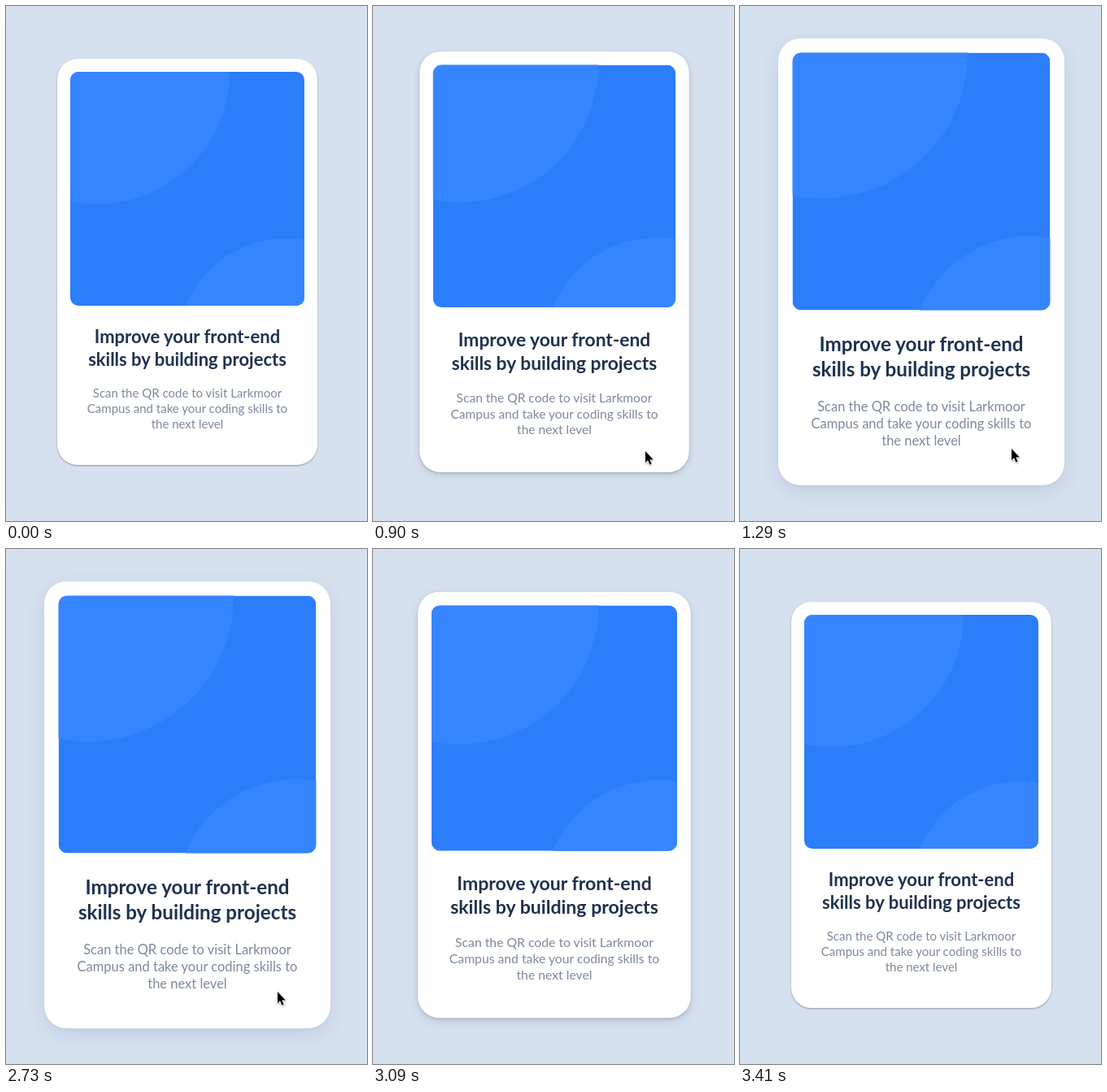
An HTML page that plays this animation: 444x634 px, repeating every 3.74 s.

```html
<!DOCTYPE html>
<html lang="en">
<head>
<meta charset="utf-8">
<title>Card hover</title>
<style>
  html, body { margin: 0; width: 100%; height: 100%; overflow: hidden; background: #d5e1ef; }
  #card {
    position: absolute; left: 63px; top: 65px; width: 320px; height: 500px;
    border-radius: 25px; background: #fff;
  }
  #card svg { display: block; }
  text { font-family: Lato, sans-serif; text-anchor: middle; }
  .title { font-size: 22px; font-weight: 700; fill: #1f314f; }
  .note { font-size: 15px; fill: #7d889e; }
  #cursor {
    position: absolute; left: 0; top: 0; overflow: visible;
    filter: drop-shadow(0 1px 1px rgba(0, 0, 0, .3));
  }
</style>
</head>
<body>
<div id="card">
  <svg width="320" height="500" viewBox="0 0 320 500">
    <clipPath id="frame"><rect x="16" y="16" width="288" height="288" rx="10"/></clipPath>
    <g clip-path="url(#frame)">
      <rect x="16" y="16" width="288" height="288" fill="#2c7dfa"/>
      <g fill="#3685ff">
        <circle cx="49" cy="16" r="163"/>
        <circle cx="282" cy="355" r="134"/>
      </g>
    </g>
    <g class="title">
      <text x="160" y="350">Improve your front-end</text>
      <text x="160" y="378">skills by building projects</text>
    </g>
    <g class="note">
      <text x="160" y="417">Scan the QR code to visit Larkmoor</text>
      <text x="160" y="436">Campus and take your coding skills to</text>
      <text x="160" y="455">the next level</text>
    </g>
  </svg>
</div>
<svg id="cursor" width="12" height="19">
  <path d="M0 0V14.2L3.1 11.3L5.4 16.8L7.7 15.8L5.4 10.4H9.8Z"
        fill="#000" stroke="#fff" stroke-width="1.6" stroke-linejoin="round" paint-order="stroke"/>
</svg>
<script>
  const LOOP = 3740;
  const rest = {
    transform: 'scale(1)',
    boxShadow: '0 1px 3px rgba(0,0,0,.12), 0 1px 2px rgba(0,0,0,.24)'
  };
  const raised = {
    transform: 'scale(1.1)',
    boxShadow: '0 7px 20px rgba(60,85,120,.13), 0 2px 6px rgba(60,85,120,.03)'
  };

  // Each step: [time in ms, state, easing towards the next step]
  function play(id, steps) {
    const frames = steps.map(([ms, state, easing = 'linear']) =>
      ({ offset: ms / LOOP, easing, ...state }));
    const anim = document.getElementById(id)
      .animate(frames, { duration: LOOP, iterations: Infinity });
    anim.startTime = document.timeline.currentTime;
  }

  const at = (x, y) => ({ transform: `translate(${x}px, ${y}px)` });

  play('card', [
    [0, rest],
    [787, rest, 'ease'],
    [1287, raised],
    [2942, raised, 'ease'],
    [3442, rest],
    [LOOP, rest]
  ]);

  play('cursor', [
    [0, at(340, 650)],
    [540, at(340, 650)],
    [570, at(339, 626)],
    [790, at(336, 566)],
    [900, at(335, 548), 'ease-out'],
    [1060, at(334, 545)],
    [2735, at(334, 545), 'ease-in'],
    [2945, at(335, 590)],
    [3060, at(337, 650)],
    [LOOP, at(340, 650)]
  ]);
</script>
</body>
</html>
```
